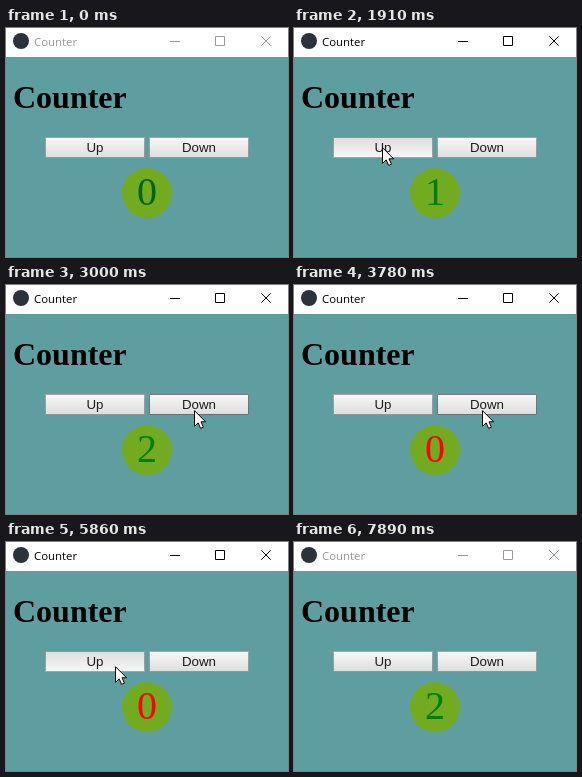
Write an HTML page that moves like this. It is 282 by 229 pixels and loops after 7960 ms.

```html
<!DOCTYPE html>
<html lang="en">
<head>
<meta charset="utf-8">
<title>Counter</title>
<style>
  html, body { margin: 0; width: 100%; height: 100%; overflow: hidden; background: #5f9ea0; }
  svg { position: absolute; left: 0; top: 0; width: 282px; height: 229px; }
  .title { font: 500 11.4px "Open Sans", sans-serif; }
  .heading { font: bold 32px "Liberation Serif", serif; }
  #count { font: 40px "Liberation Serif", serif; text-anchor: middle; }
  #bar { color: #999; }
  #bar.active { color: #000; }
  .button {
    position: absolute; top: 109px; width: 100px; height: 21px;
    font: 13.333px/21px "Liberation Sans", sans-serif; text-align: center; color: #1c1c1c;
    border-radius: 1px;
    background: linear-gradient(#f8f8f8, #ddd);
    box-shadow: inset 0 0 0 1px rgba(0, 0, 0, .333);
  }
  .hover { box-shadow: inset 0 0 0 1px rgba(0, 0, 0, .5); }
  .pressed { background: linear-gradient(#ddd, #f8f8f8); }
</style>
</head>
<body>
<svg viewBox="0 0 282 229">
  <rect width="282" height="29" fill="#fff"/>
  <circle cx="15" cy="13" r="8" fill="#2b323c"/>
  <g id="bar">
    <text class="title" x="28" y="18" fill="currentColor">Counter</text>
    <path d="M164 13.5h10M209.5 8.5h9v9h-9zM255.3 8.3l9.4 9.4M264.7 8.3l-9.4 9.4" fill="none" stroke="currentColor"/>
  </g>
  <text class="heading" x="7" y="80">Counter</text>
  <circle cx="141" cy="165" r="25" fill="#72aa20"/>
  <text id="count" x="141" y="177"></text>
</svg>
<div class="button" id="up" style="left:39px">Up</div>
<div class="button" id="down" style="left:143px">Down</div>
<svg viewBox="0 0 282 229">
  <path id="cursor" d="M.5 .7V16.3L4.2 12.9L6.6 18.4L9.4 17.2L7 11.8H11.6Z"
        fill="#fff" stroke="#000" stroke-linejoin="round"/>
</svg>
<script>
const LOOP = 7960, STEP = 77, HOLD = 80;

// The pointer eases out towards each key point in turn
const entry = { x: 123, y: 179 };
const glides = [
  { at: 600, steps: 3, x: 87, y: 100 },
  { at: 980, steps: 5, x: 88, y: 119 },
  { at: 2390, steps: 4, x: 188, y: 125 },
  { at: 5240, steps: 7, x: 109, y: 124 },
  { at: 6480, steps: 2, x: 106, y: 125 },
  { at: 7020, steps: 6, x: 248, y: 222 },
];

// Evenly spaced runs of clicks
const bursts = [
  { at: 1450, gap: 430, times: 3, change: 1 },
  { at: 2920, gap: 385, times: 3, change: -1 },
  { at: 4620, gap: 400, times: 2, change: -1 },
  { at: 5860, gap: 400, times: 2, change: 1 },
];
const clicks = bursts.flatMap(({ at, gap, times, change }) =>
  Array.from({ length: times }, (_, i) => ({ press: at + i * gap, release: at + i * gap + HOLD, change })));

const $ = id => document.getElementById(id);
const within = (t, from, to) => t >= from && t < to;
const easeOut = p => 1 - (1 - p) ** 3;

function pointerAt(t) {
  let { x, y } = entry;
  for (const glide of glides) {
    if (t < glide.at) break;
    const step = Math.min(glide.steps, Math.floor((t - glide.at) / STEP));
    const p = easeOut(step / glide.steps);
    x += (glide.x - x) * p;
    y += (glide.y - y) * p;
  }
  return [Math.round(x), Math.round(y)];
}

function drawButton(id, left, x, y, live, pressed) {
  const over = live && within(x, left, left + 100) && within(y, 109, 130);
  $(id).className = "button" + (over ? pressed ? " pressed" : " hover" : "");
}

function draw(t) {
  const [x, y] = pointerAt(t);
  const shown = within(t, 600, 7560);
  const active = within(t, 980, 7890);
  const pressed = clicks.some(({ press, release }) => within(t, press, release));
  const done = clicks.filter(({ release }) => t >= release);
  const count = done.reduce((n, { change }) => Math.max(0, n + change), 0);

  $("bar").setAttribute("class", active ? "active" : "");
  $("count").textContent = count;
  $("count").style.fill = !done.length ? "#006400" : count ? "green" : "red";
  drawButton("up", 39, x, y, shown && active, pressed);
  drawButton("down", 143, x, y, shown && active, pressed);
  $("cursor").style.display = shown ? "" : "none";
  $("cursor").setAttribute("transform", `translate(${x} ${y})`);
}

const began = performance.now();
function tick() {
  draw((performance.now() - began) % LOOP);
  requestAnimationFrame(tick);
}
tick();
</script>
</body>
</html>
```
